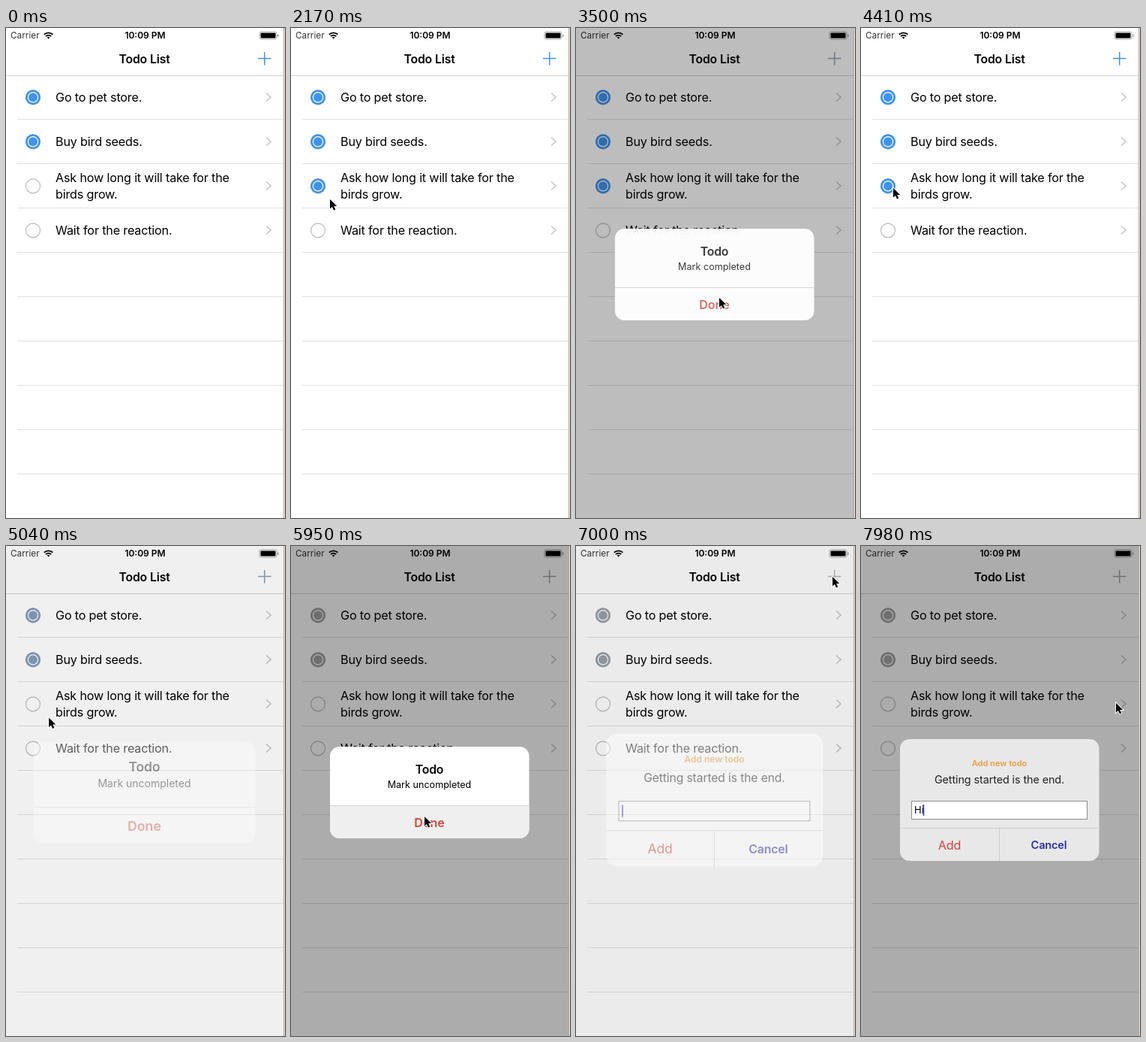
Recreate the animation shown at these times as an HTML page. Size 372 px wide and 652 px high, loop 8 s.

```html
<!DOCTYPE html>
<html lang="en">
<head>
<meta charset="utf-8">
<title>Todo List</title>
<style>
  html, body { margin: 0; width: 100%; height: 100%; overflow: hidden; background: #fff; }
  svg { display: block; width: 372px; height: 652px; }
  text { font-family: Inter, "Open Sans", sans-serif; white-space: pre; }
  .row { font-size: 16.2px; letter-spacing: -.19px; }
  .bold { font-size: 15.8px; font-weight: 600; letter-spacing: -.15px; }
  .mid { text-anchor: middle; }
  .red { fill: #d2443a; }
  .line { fill: none; stroke: #e0e0e0; }
  .sep { fill: none; stroke: #d6d6d6; }
</style>
</head>
<body>
<svg viewBox="0 0 372 652">
  <rect width="372" height="652" fill="#fff"/>
  <g id="list"></g>
  <path d="M0 63.5H370" stroke="#d2d2d2"/>
  <text x="6" y="14.3" font-size="11.8" fill="#333">Carrier</text>
  <g fill="none" stroke="#000" stroke-width="1.9">
    <path d="M50.8 8.6a8.6 8.6 0 0 1 11.6 0M53 11a5.4 5.4 0 0 1 7.2 0"/>
    <path d="M56.6 14.6l-1.9-2a2.8 2.8 0 0 1 3.8 0z" fill="#000" stroke="none"/>
  </g>
  <text class="mid" x="185.5" y="14.3" font-size="12" font-weight="600">10:09 PM</text>
  <rect x="338" y="5" width="23" height="10" rx="2.2" fill="none" stroke="#aaa"/>
  <rect x="339.5" y="6.5" width="20" height="7" rx="1"/>
  <path d="M362.8 8.5v3.5" stroke="#999" stroke-width="1.3"/>
  <text class="bold mid" x="184.5" y="47">Todo List</text>
  <path id="plus" d="M336 40.5h17.5M344.7 32v17.5" stroke="currentColor" stroke-width="1.5"/>
  <rect id="dim" width="370" height="652"/>
  <path d="M370.5 0V652" stroke="#b9a396"/>
  <path d="M371.5 0V652" stroke="#eee2da"/>

  <g id="mark">
    <rect x="52" y="267" width="265.5" height="122" rx="12.5" fill="#fff"/>
    <path id="press" d="M52 346H317.5V376.5a12.5 12.5 0 0 1-12.5 12.5H64.5a12.5 12.5 0 0 1-12.5-12.5z" fill="#efefef"/>
    <path class="sep" d="M52 345.5H317.5"/>
    <g id="words">
      <text class="bold mid" x="184.5" y="302.5">Todo</text>
      <text id="note" class="mid" x="184.5" y="322" font-size="12.6"></text>
      <text class="mid red" x="184.5" y="374" font-size="16" font-weight="600">Done</text>
    </g>
  </g>

  <g id="add">
    <rect id="panel" x="52" y="257" width="265.5" height="162" rx="12.5"/>
    <path class="sep" style="stroke:#ccc" d="M52 375.5H317.5M184.5 375.5V419"/>
    <text class="mid" x="184.5" y="292.5" font-size="11" font-weight="600" fill="#f09b41">Add new todo</text>
    <text class="mid" x="184.5" y="315.8" font-size="14.4" letter-spacing="-.1" fill="#222">Getting started is the end.</text>
    <rect x="67.5" y="339.5" width="234" height="24" fill="#fff" stroke="#8c8c8c"/>
    <text id="typed" x="71" y="356" font-size="13"></text>
    <path id="caret" d="M0 344v15" stroke="#3f45b8" stroke-width="1.6"/>
    <text class="row mid red" x="118" y="403.5">Add</text>
    <text class="mid" x="250.5" y="403" font-size="14.6" font-weight="600" letter-spacing="-.2" fill="#2a2fae">Cancel</text>
  </g>

  <path id="cursor" d="M0 0V12.6l2.9-2.7 2.1 4.7 2.2-1-2-4.5h4z" stroke="#fff" stroke-width="1.8" paint-order="stroke"/>
</svg>
<script>
const $ = id => document.getElementById(id);
const clamp = v => Math.max(0, Math.min(1, v));
const mix = (a, b, k) => a + (b - a) * k;

const todos = [
  ["Go to pet store."],
  ["Buy bird seeds."],
  ["Ask how long it will take for the", "birds grow."],
  ["Wait for the reaction."]
];

let markup = "";
for (let i = 0; i < 9; i++) markup += `<path class="line" d="M15 ${121.5 + 59 * i}H370"/>`;
todos.forEach((lines, i) => {
  const y = 92 + 59 * i;
  const top = lines.length > 1 ? y - 5 : y + 6;
  lines.forEach((s, n) => markup += `<text class="row" x="66" y="${top + 22 * n}">${s}</text>`);
  markup += `<circle cx="36" cy="${y + .3}" r="9.5" fill="none" stroke="#bbb" stroke-width="1.2"/>
    <path d="M347 ${y - 5.5}l6 5.5-6 5.5" fill="none" stroke="#c6c6ca" stroke-width="1.6"/>`;
  if (i < 3) markup += `<g id="check${i}"><circle cx="36" cy="${y + .3}" r="10" fill="currentColor"/>
    <circle cx="36" cy="${y + .3}" r="6.6" fill="none" stroke="#fff" stroke-width="1.2"/></g>`;
});
$("list").innerHTML = markup;

// Pointer stops: time, x, y
const stops = [
  [700, 374, 470], [1400, 36, 206], [1600, 38, 208], [1890, 52, 228],
  [2200, 52, 228], [2730, 191, 359], [3560, 191, 359], [4060, 87, 152],
  [4130, 87, 152], [4410, 43, 213], [4900, 43, 213], [5600, 178, 360],
  [6120, 178, 360], [6580, 338, 38], [6650, 338, 38], [6720, 342, 41],
  [7150, 342, 41], [7630, 340, 209]
];

function pointer(t) {
  const i = stops.findIndex(s => s[0] > t);
  if (i === 0) return [400, 470];
  if (i < 0) return stops[stops.length - 1].slice(1);
  const [t0, x0, y0] = stops[i - 1], [t1, x1, y1] = stops[i];
  const u = (t - t0) / (t1 - t0), k = u * u * (3 - 2 * u);
  return [mix(x0, x1, k), mix(y0, y1, k)];
}

// An alert zooms in while fading up, then fades away at full size
function alertState(t, start, end) {
  const u = clamp((t - start) / 400), out = clamp((t - end) / 350);
  return {
    u, out,
    scale: 1 + .2 * (1 - u) ** 3,
    alpha: clamp(u * 2.1) * (1 - out * out),
    dim: u * (1 - out),
    gray: clamp(u * 3.8) * (1 - clamp(out * 5)),
    plusGray: clamp(u * 3.8) * (1 - out)
  };
}

function show(el, a, cy) {
  el.style.opacity = a.alpha;
  el.setAttribute("transform", `translate(184.7 ${cy}) scale(${a.scale}) translate(-184.7 ${-cy})`);
}

const tint = gray => `rgb(${[61, 147, 238].map(c => Math.round(mix(c, 163, gray)))})`;

function draw(t) {
  const first = t < 4500;
  const mark = first ? alertState(t, 2180, 3430) : alertState(t, 4970, 6120);
  const add = alertState(t, 6906, 9000);
  show($("mark"), mark, 328);
  show($("add"), add, 338);
  $("words").style.opacity = 1 - mark.out;
  const shade = Math.round(mix(255, 232, add.u ** 2));
  $("panel").setAttribute("fill", `rgb(${shade},${shade},${shade})`);

  $("note").textContent = first ? "Mark completed" : "Mark uncompleted";
  const pressed = t >= 3290 && t < 3430 || t >= 5810 && t < 6120;
  $("press").style.opacity = pressed ? 1 : 0;
  $("dim").style.opacity = .325 * Math.max(mark.dim, add.dim);

  $("list").style.color = tint(Math.max(mark.gray, add.gray));
  $("plus").style.color = tint(Math.max(mark.plusGray, add.plusGray));
  $("plus").style.opacity = t < 6685 ? 1 : mix(.6, 1, clamp((t - 6900) / 300));
  $("check2").style.opacity = t >= 1680 && t < 4620 ? 1 : 0;

  const typed = t < 7770 ? "" : t < 7910 ? "H" : "Hi";
  $("typed").textContent = typed;
  $("caret").setAttribute("transform", `translate(${[72, 80.5, 83.5][typed.length]} 0)`);
  $("cursor").setAttribute("transform", `translate(${pointer(t)})`);
}

function frame() {
  draw(performance.now() % 8000);
  requestAnimationFrame(frame);
}
frame();
</script>
</body>
</html>
```
